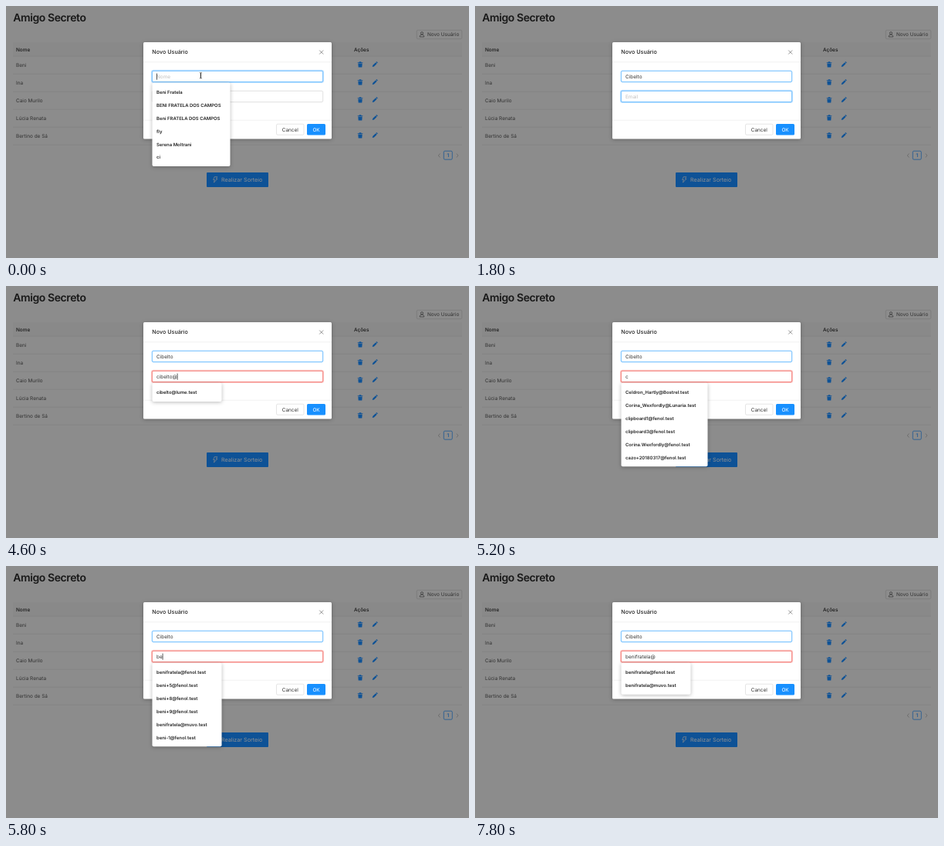
Animation, 600 px wide and 327 px high, one loop 8 s. Source, as an HTML page:

```html
<!DOCTYPE html>
<html lang="pt">
<head>
<meta charset="utf-8">
<style>
  html, body { margin: 0; width: 100%; height: 100%; overflow: hidden; background: #8c8c8c; }
  svg { display: block; width: 600px; height: 327px; font: 6.45px Inter, sans-serif; text-rendering: geometricPrecision; }
  .page { fill: #303030; }
  .blue { fill: #0e5296; }
  .blueLine { fill: none; stroke: #0e5296; }
  .line { stroke: #7f7f7f; stroke-width: .6; }
  .outline { fill: none; stroke: #757575; stroke-width: .6; }
  .icon { fill: none; stroke: #303030; stroke-width: .7; }
  .strong { font-weight: 500; fill: #181818; }
  .modal { fill: #333; }
  .modal .line { stroke: #e8e8e8; }
  .option { font-size: 5.95px; font-weight: 600; fill: #222; }
  .shadow { filter: drop-shadow(0 1.5px 2.5px rgba(0, 0, 0, .28)); }
</style>
</head>
<body>
<svg viewBox="0 0 600 327">
  <defs>
    <g id="trash" class="blue">
      <path d="M-3.3-2.7h2v-1h2.6v1h2v.8h-6.6zM-2.7-1.5h5.4l-.4 5h-4.6z"/>
    </g>
    <g id="pencil" class="blue" transform="rotate(45)">
      <path d="M-1.1-4.6h2.2v1.2h-2.2zM-1.1-2.9h2.2v5.2l-1.1 2.1-1.1-2.1z"/>
    </g>
  </defs>

  <g class="page">
    <text x="9.3" y="20.3" class="strong" style="font-size:14px;font-weight:600;letter-spacing:-.03em">Amigo Secreto</text>
    <rect class="outline" x="532.3" y="31.3" width="58.5" height="11.4" rx="1.5"/>
    <g class="icon"><circle cx="539" cy="35.3" r="1.6"/><path d="M536.2 40c0-4 5.6-4 5.6 0z"/></g>
    <text x="546" y="39.4">Novo Usuário</text>
    <rect x="9" y="47" width="582" height="18" fill="#898989"/>
    <path class="line" d="M9 65.2h582"/>
    <text x="13" y="58.5" class="strong">Nome</text>
    <text x="451" y="58.5" class="strong">Ações</text>
    <g id="rows"></g>
    <path class="icon" style="stroke:#626262" d="M562.5 191.5l-2.2 2.5 2.2 2.5M583.8 191.5l2.2 2.5-2.2 2.5"/>
    <rect class="blueLine" stroke-width=".7" x="567.3" y="188.2" width="11" height="11" rx="1.5"/>
    <text x="572.8" y="196.2" text-anchor="middle" class="blue" font-weight="500">1</text>
    <rect class="blue" x="260" y="216" width="80" height="19" rx="1"/>
    <path d="M270.2 221.7h3.6l-1.5 2.6h1.7l-4.6 4.8 1.1-3.6h-1.9z" fill="none" stroke="#8c8c8c" stroke-width=".7"/>
    <text x="279" y="228.2" style="font-size:7.2px;fill:#929292">Realizar Sorteio</text>
  </g>

  <g class="modal">
    <rect x="178" y="47" width="244" height="125.4" rx="1.5" fill="#fff" class="shadow"/>
    <path class="line" d="M178 72.7h244M178 148.2h244"/>
    <text x="189.3" y="62.3" style="font-size:7.2px;font-weight:500;fill:#202020">Novo Usuário</text>
    <path d="M406.2 57.5l5 5m0-5l-5 5" stroke="#777" stroke-width=".8"/>
    <rect x="350.5" y="153.2" width="35.5" height="14" rx="1.5" fill="#fff" stroke="#d4d4d4" stroke-width=".6"/>
    <text x="368.3" y="162.6" text-anchor="middle">Cancel</text>
    <rect x="390" y="153" width="24" height="14.5" rx="1.5" fill="#1890ff"/>
    <text x="402" y="162.6" text-anchor="middle" fill="#fff">OK</text>
    <g id="fields"></g>
    <g id="dropdown"></g>
    <path id="pointer" d="M251 86.5q1.4 0 1.4 1.2v5q0 1.2-1.4 1.2M253.8 86.5q-1.4 0-1.4 1.2v5q0 1.2 1.4 1.2" fill="none" stroke="#111" stroke-width=".7"/>
  </g>
</svg>

<script>
const $ = id => document.getElementById(id);
const LOOP = 8000;
const PERSON = 'Cibelto', MAIL = 'benifratela';

const people = ['Beni', 'Ina', 'Caio Murilo', 'Lúcia Renata', 'Bertino de Sá'];
$('rows').innerHTML = people.map((person, i) => {
  const y = 76 + 23 * i;
  return `<text x="13" y="${y + 2.9}">${person}</text>
    <use href="#trash" x="459" y="${y}"/><use href="#pencil" transform="translate(477.8 ${y})"/>
    <path class="line" d="M9 ${y + 12.2}h582"/>`;
}).join('');

const lists = {
  names: { width: 101, items: ['Beni Fratela', 'BENI FRATELA DOS CAMPOS', 'Beni FRATELA DOS CAMPOS', 'fly', 'Serena Moltrani', 'ci'] },
  ci: { width: 101, items: ['ci'] },
  twoMails: { width: 90, items: ['cibelto@lume.test', 'cidra@fast-inbox.test'] },
  oneMail: { width: 90, items: ['cibelto@lume.test'] },
  c: { width: 112, items: ['Celdron_Hartly@Bostrel.test', 'Corina_Wexfordly@Lunaria.test', 'clipboard1@fenol.test',
    'clipboard3@fenol.test', 'Corina.Wexfordly@fenol.test', 'cazo+20180317@fenol.test'] },
  be: { width: 90, items: ['benifratela@fenol.test', 'beni+5@fenol.test', 'beni+8@fenol.test',
    'beni+9@fenol.test', 'benifratela@muvo.test', 'beni-1@fenol.test'] },
  benif: { width: 112, items: ['benifratela@fenol.test', 'benifratela@muvo.test', 'benifratelacompany@muvo.test',
    'benifratela', 'benifratelaa@muvo.test', 'benifratelasdgasg@muvo.test'] },
  full: { width: 90, items: ['benifratela@fenol.test', 'benifratela@muvo.test'] },
};

// Each step: time, focused field, its text, suggestion list, caret shown
const NAME = 0, EMAIL = 1;
const person = n => PERSON.slice(0, n), low = n => person(n).toLowerCase(), mail = n => MAIL.slice(0, n);
const steps = [
  [0, NAME, '', 'names', 1],
  [200, NAME, person(1), 'ci', 1],
  [400, NAME, person(2), 'ci', 1],
  [600, NAME, person(3), '', 1],
  [800, NAME, person(4), '', 1],
  [1000, NAME, person(5), '', 1],
  [1200, NAME, person(7), '', 1],
  [1400, EMAIL, '', '', 1],
  [1800, EMAIL, '', '', 0],
  [2200, EMAIL, '', '', 1],
  [2600, EMAIL, low(1), '', 1],
  [2800, EMAIL, low(2), 'twoMails', 1],
  [3400, EMAIL, low(2), 'twoMails', 0],
  [4000, EMAIL, low(3), 'oneMail', 1],
  [4200, EMAIL, low(5), 'oneMail', 1],
  [4400, EMAIL, low(7), 'oneMail', 1],
  [4600, EMAIL, low(7) + '@', 'oneMail', 1],
  [5000, EMAIL, low(4), 'oneMail', 1],
  [5200, EMAIL, low(1), 'c', 0],
  [5400, EMAIL, mail(1), 'be', 1],
  [5800, EMAIL, mail(2), 'be', 1],
  [6000, EMAIL, mail(4), 'be', 1],
  [6200, EMAIL, mail(5), 'benif', 1],
  [6400, EMAIL, mail(6), 'benif', 1],
  [6600, EMAIL, mail(7), 'benif', 1],
  [6800, EMAIL, mail(9), 'benif', 1],
  [7000, EMAIL, mail(11), 'benif', 0],
  [7200, EMAIL, MAIL + '@', 'full', 1],
  [7800, EMAIL, MAIL + '@', 'full', 0],
];

function fieldMarkup(y, text, placeholder, border, focused) {
  const glow = focused ? `<rect x="188.8" y="${y - .4}" width="222.4" height="15.4" rx="2" fill="none" stroke="${border}" stroke-opacity=".25" stroke-width="1.8"/>` : '';
  return `${glow}<rect x="189.3" y="${y + .2}" width="221.4" height="14.4" rx="1.6" fill="#fff" stroke="${border}" stroke-width=".8"/>
    <text x="195" y="${y + 9.7}" fill="${text ? '#333' : '#bfbfbf'}">${text || placeholder}</text>`;
}

function dropdownMarkup(top, { width, items }) {
  const options = items.map((item, i) =>
    `<text class="option" x="195" y="${top + 14.6 + 16.85 * i}">${item}</text>`).join('');
  return `<rect class="shadow" x="189.5" y="${top}" width="${width}" height="${items.length * 16.85 + 7.3}" rx="2" fill="#fff"/>${options}`;
}

function render([, focus, text, list, caret]) {
  const onName = focus === NAME;
  const values = onName ? [text, ''] : [PERSON, text];
  const emailBorder = onName ? '#d9d9d9' : text ? '#f2564f' : '#40a9ff';
  $('fields').innerHTML = fieldMarkup(84, values[0], 'Nome', '#40a9ff', onName)
    + fieldMarkup(110, values[1], 'Email', emailBorder, !onName);
  if (caret) {
    const width = text ? $('fields').querySelectorAll('text')[focus].getComputedTextLength() : 0;
    $('fields').innerHTML += `<rect x="${195 + width}" y="${onName ? 87.5 : 113.5}" width=".7" height="8.2" fill="#111"/>`;
  }
  $('dropdown').innerHTML = list ? dropdownMarkup(onName ? 99.5 : 125.8, lists[list]) : '';
  $('pointer').style.display = onName && !text ? '' : 'none';
}

let shown;
function tick() {
  const time = performance.now() % LOOP;
  const step = steps.findLast(([start]) => start <= time);
  if (step !== shown) render(shown = step);
  requestAnimationFrame(tick);
}
tick();
</script>
</body>
</html>
```
